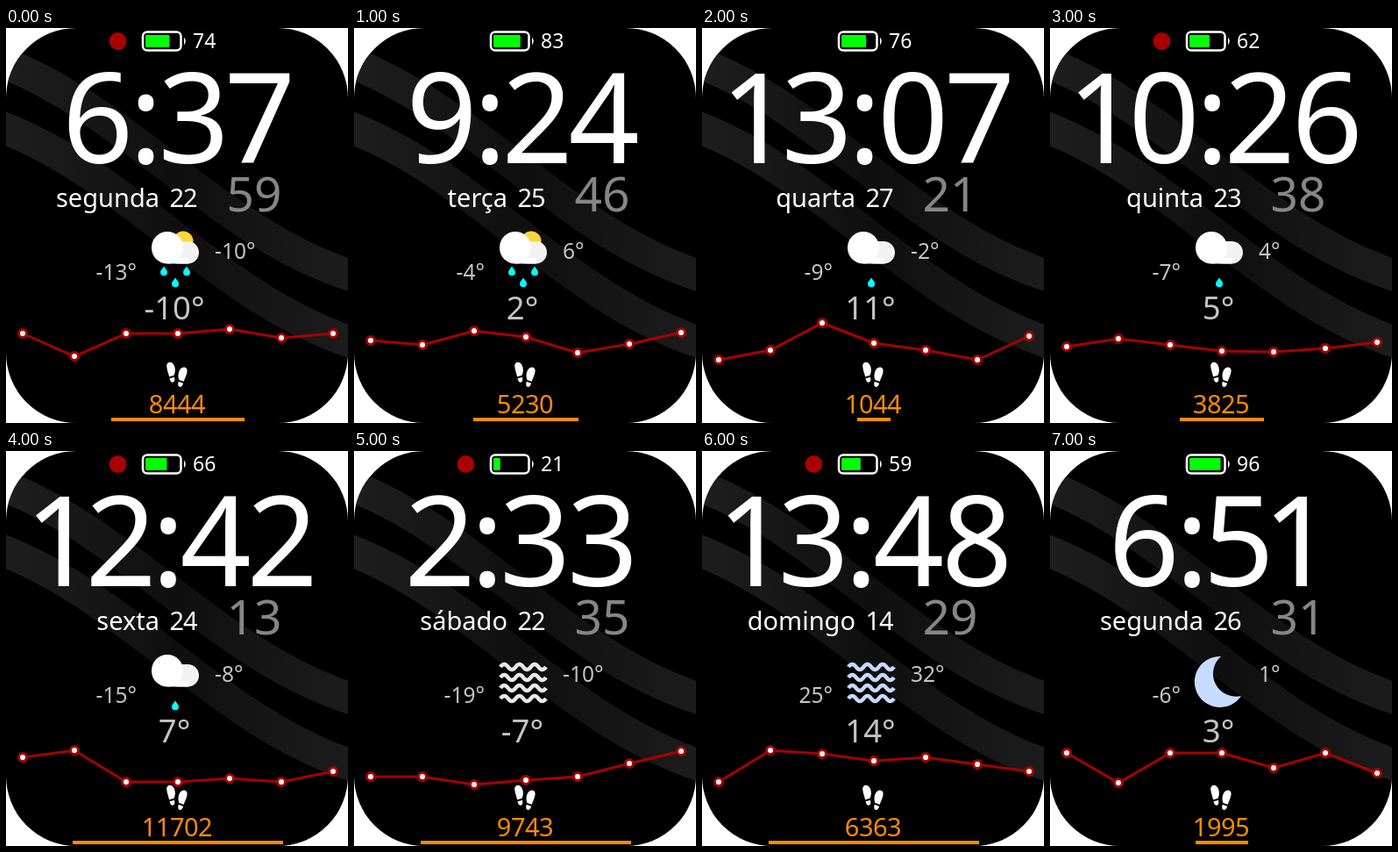
Write an HTML page that moves like this. It is 390 by 450 pixels and loops after 8000 ms.

```html
<!DOCTYPE html>
<html lang="pt">
<head>
<meta charset="utf-8">
<title>Watch face</title>
<style>
  html, body { margin: 0; width: 100%; height: 100%; overflow: hidden; background: #fff; }
  svg { display: block; width: 390px; height: 450px; }
  text { font-family: "Noto Sans", "Open Sans", sans-serif; fill: #fff; white-space: pre; }
  .mid { text-anchor: middle; }
  .end { text-anchor: end; }
  #time { font-size: 142px; }
  #day, #date { font-size: 29px; }
  #date { letter-spacing: -1px; }
  #sec { font-size: 55px; fill: #868686; }
  #charge { font-size: 23px; }
  #low, #high { font-size: 24.5px; fill: #c4c4c4; }
  #temp { font-size: 36.5px; fill: #c4c4c4; }
  #steps { font-size: 29px; fill: #ff8c00; letter-spacing: -.5px; }
</style>
</head>
<body>
<svg viewBox="0 0 390 450">
  <defs>
    <clipPath id="case"><rect width="390" height="450" rx="80"/></clipPath>
    <linearGradient id="sheen" gradientUnits="userSpaceOnUse" x1="0" y1="0" x2="390" y2="0">
      <stop offset="0" stop-color="#1e1e1e"/>
      <stop offset=".5" stop-color="#0f0f0f"/>
      <stop offset="1" stop-color="#1c1c1c"/>
    </linearGradient>
    <path id="drop" fill="#0ff" d="M0-5.500C2-2.500 4-1 4 1.200A4 4 0 0 1-4 1.200C-4-1-2-2.500 0-5.500Z"/>
    <g id="foot">
      <path d="M-4.500-3C-5-10 3-10 4.500-3C5.500 2 4 5 3 7L-2.500 8C-3 4-4.200 2-4.500-3Z"/>
      <path d="M-2.200 10L3.300 9C4.800 16-1.500 17-2.200 10Z"/>
    </g>
    <g id="cloud">
      <rect x="184" y="243" width="36" height="25.500" rx="12.700" fill="#f2f2f2"/>
      <rect x="166" y="232" width="36" height="36.500" rx="18" fill="#fff"/>
      <path d="M184 268.500V262H208V268.500Z" fill="#fff"/>
    </g>
  </defs>

  <g clip-path="url(#case)">
    <rect width="390" height="450"/>
    <g fill="none" stroke="url(#sheen)" stroke-width="36">
      <path d="M-10 37C140 92 240 235 400 284"/>
      <path d="M-10 111C140 166 240 309 400 360"/>
    </g>
  </g>

  <circle id="link" cx="127.500" cy="15" r="10" fill="#a80000"/>
  <rect x="156" y="4.500" width="43.500" height="21" rx="5" fill="none" stroke="#fff" stroke-width="2.500"/>
  <path d="M203 10.500Q206.500 15 203 19.500Z" fill="#fff"/>
  <rect id="level" x="159" y="8" height="14" rx="1" fill="#0f0"/>
  <text id="charge" x="213" y="23"/>

  <text id="time" class="mid" y="154"/>
  <text id="day" class="end" x="175" y="204"/>
  <text id="date" class="mid" x="202" y="204"/>
  <text id="sec" class="mid" x="283" y="208.500"/>

  <g id="icon"></g>
  <text id="low" class="end" x="149" y="287"/>
  <text id="high" x="238" y="263"/>
  <text id="temp" class="mid" x="192" y="332"/>

  <polyline id="line" fill="none" stroke="#a80000" stroke-width="3"/>
  <g id="dots" fill="#fff" stroke="#a80000" stroke-width="3"></g>

  <g fill="#fff">
    <use href="#foot" transform="translate(188 389) rotate(-4)"/>
    <use href="#foot" transform="translate(201.500 394.500) scale(-1 1) rotate(-9)"/>
  </g>
  <text id="steps" class="mid" x="195" y="438.500"/>
  <rect id="bar" y="444" height="4" fill="#ff8c00"/>
</svg>

<script>
const $ = id => document.getElementById(id);
const HOLD = 1000;

const use = (id, x = 0, y = 0) => `<use href="#${id}" x="${x}" y="${y}"/>`;
const waves = color => [246, 258, 270, 282].map(y =>
  `<path d="M167 ${y}q4.330-6 8.660 0t8.660 0 8.660 0 8.660 0 8.660 0 8.660 0"
    fill="none" stroke="${color}" stroke-width="4.500"/>`).join('');

const drizzle = use('cloud') + use('drop', 193, 290);
const icons = {
  showers: '<circle cx="202" cy="243" r="11.500" fill="#ffd63c"/>' + use('cloud') +
    use('drop', 180, 277) + use('drop', 206, 277) + use('drop', 193, 290),
  drizzle,
  mist: waves('#e8e8e8'),
  haze: waves('#c8d8ff'),
  moon: '<path d="M195 234A29 29 0 1 0 218 279A26 26 0 0 1 195 234Z" fill="#c8dcff"/>'
};

// time, clock centre, seconds, day, date, charge, link, icon, low, high, temp, steps, bar width, chart
const keys = 'time cx sec day date charge link icon low high temp steps bar chart'.split(' ');
const faces = [
  ['6:37', 196, '59', 'segunda', 22, 74, 1, 'showers', -13, -10, -10, 8444, 152, [348, 374, 348, 348, 343, 353, 348]],
  ['9:24', 192, '46', 'terça', 25, 83, 0, 'showers', -4, 6, 2, 5230, 120, [356, 361, 345, 352, 370, 360, 347]],
  ['13:07', 192, '21', 'quarta', 27, 76, 0, 'drizzle', -9, -2, 11, 1044, 38, [378, 367, 336, 359, 367, 378, 351]],
  ['10:26', 192, '38', 'quinta', 23, 62, 1, 'drizzle', -7, 4, 5, 3825, 96, [363, 354, 361, 368, 369, 365, 358]],
  ['12:42', 192, '13', 'sexta', 24, 66, 1, 'drizzle', -15, -8, 7, 11702, 240, [349, 341, 377, 377, 373, 377, 365]],
  ['2:33', 191, '35', 'sábado', 22, 21, 1, 'mist', -19, -10, -7, 9743, 240, [371, 371, 380, 375, 371, 356, 342]],
  ['13:48', 190, '29', 'domingo', 14, 59, 1, 'haze', 25, 32, 14, 6363, 240, [377, 341, 345, 353, 349, 357, 365]],
  ['6:51', 191, '31', 'segunda', 26, 96, 0, 'moon', -6, 1, 3, 1995, 60, [344, 378, 344, 344, 361, 344, 367]]
].map(row => Object.fromEntries(keys.map((k, i) => [k, row[i]])));

// Proportional spacing for the large figures
const advance = { 0: 78, 1: 62, 2: 76, 3: 77, 4: 76, 5: 74, 6: 78, 7: 74, 8: 80, 9: 78, ':': 32 };

function setTime(str, cx) {
  const w = [...str].map(c => advance[c]);
  let x = cx - w.reduce((a, b) => a + b) / 2;
  $('time').setAttribute('x', w.map(v => (x += v) - v / 2).join(' '));
  $('time').textContent = str;
}

function show(f) {
  setTime(f.time, f.cx);
  for (const k of ['sec', 'day', 'date', 'charge', 'steps']) $(k).textContent = f[k];
  for (const k of ['low', 'high', 'temp']) $(k).textContent = f[k] + '°';
  $('link').style.display = f.link ? '' : 'none';
  $('level').setAttribute('width', f.charge * .37);
  $('icon').innerHTML = icons[f.icon];
  $('bar').setAttribute('x', 196 - f.bar / 2);
  $('bar').setAttribute('width', f.bar);
  const pts = f.chart.map((y, i) => [19 + i * 59, y]);
  $('line').setAttribute('points', pts.join(' '));
  $('dots').innerHTML = pts.map(([x, y]) => `<circle cx="${x}" cy="${y}" r="4.500"/>`).join('');
}

let current = -1;
function tick() {
  const i = Math.floor(performance.now() / HOLD) % faces.length;
  if (i !== current) show(faces[current = i]);
  requestAnimationFrame(tick);
}
tick();
</script>
</body>
</html>
```
